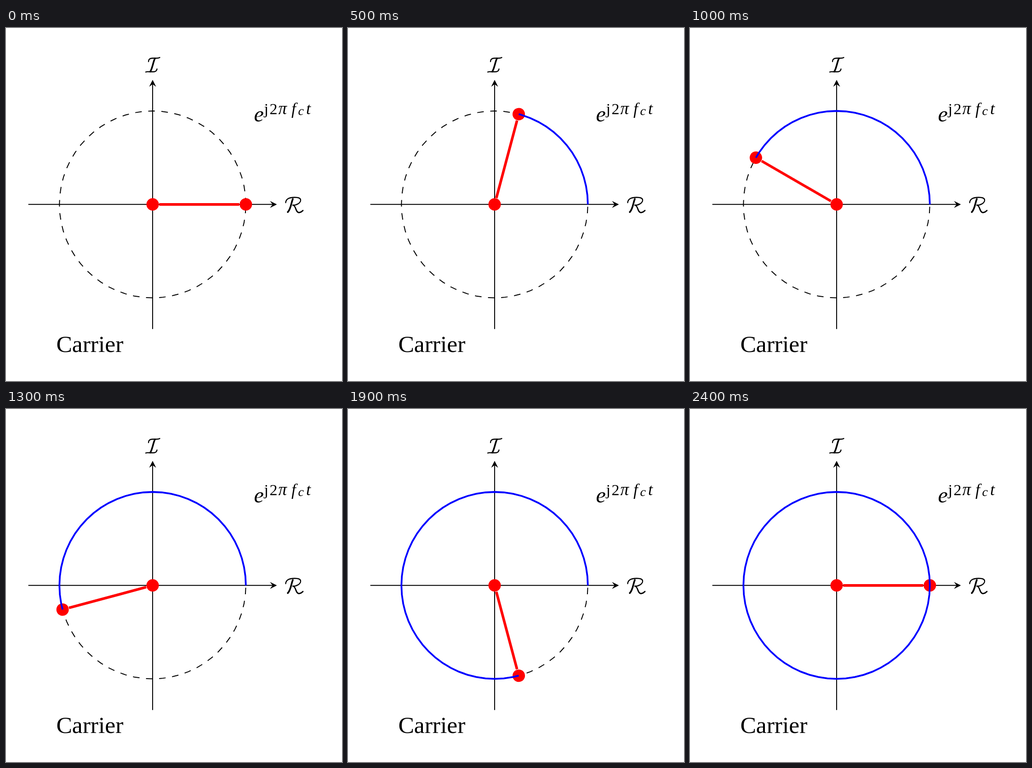
An HTML page for the animation above (2500 ms loop, 731x766 px).

```html
<!DOCTYPE html>
<html lang="en">
<head>
<meta charset="utf-8">
<title>Rotating carrier phasor</title>
<style>
  html, body { margin: 0; width: 100%; height: 100%; overflow: hidden; background: #fff; }
  svg { display: block; width: 731px; height: 766px; }
  text { font-family: "Liberation Serif", serif; }
  .math { font-style: italic; }
  .line { fill: none; stroke: #000; stroke-width: 2; }
  .script { fill: none; stroke: #000; stroke-width: 2.3; stroke-linecap: round; stroke-linejoin: round; }
  .script .thick { stroke-width: 3.6; }
</style>
</head>
<body>
<svg viewBox="0 0 731 766">
  <g transform="translate(319 382.8)">
    <path class="line" d="M-270.4 0H262M0 270.4V-262"/>
    <path id="tip" d="M270.4 0L255.2 7.6L260.9 0L255.2 -7.6Z"/>
    <use href="#tip" transform="rotate(-90)"/>
    <path id="orbit" class="line" stroke-dasharray="14.256"/>
    <g fill="#f00">
      <circle r="13.5"/>
      <g id="arm">
        <path d="M14.4 0H188.4" stroke="#f00" stroke-width="5.7"/>
        <circle cx="202.8" r="13.5"/>
      </g>
    </g>
    <path id="trail" fill="none" stroke="#00f" stroke-width="3.8"/>
  </g>

  <g class="script" role="img" aria-label="I">
    <path d="M310 73C310 67 314 65.5 319 65.5H328C331 65.5 333 65 334.5 64"/>
    <path class="thick" d="M324 66C320 74 319 86 314 94.5"/>
    <path d="M304 95.5C306 94.5 308 95 312 95H321C326 95 328 92 328.5 89"/>
  </g>
  <g class="script" role="img" aria-label="R">
    <path d="M608.5 379C609 371 617 367.5 628 367.5C636 367.5 641 369 641 373.5C641 380 632 384.5 624 384.5"/>
    <path class="thick" d="M624 371C620 381 620 392 613 399.5"/>
    <path d="M625 384.5C631 386 630 400 637 400.5C641 400.5 644 398 646 396" stroke-width="2.8"/>
  </g>

  <text class="math" x="539.5" y="203" font-size="48">e</text>
  <g font-size="34">
    <text x="561.5" y="187">j</text>
    <text x="573.5" y="187">2</text>
    <text class="math" x="592.5" y="187" font-size="37">π</text>
    <text class="math" x="621" y="187" font-size="35">f</text>
    <text class="math" x="635.5" y="188.5" font-size="28">c</text>
    <text class="math" x="653" y="187" font-size="36">t</text>
  </g>
  <text x="109.5" y="703" font-size="51.5">Carrier</text>
</svg>
<script>
  const RADIUS = 202.8, STEP_MS = 100, STEPS = 25, STEP_DEG = 15, CHORD_DEG = 5.625;
  const byId = id => document.getElementById(id);
  const arm = byId("arm"), trail = byId("trail");

  function pointAt(deg) {
    const a = deg * Math.PI / 180;
    return `${(RADIUS * Math.cos(a)).toFixed(2)} ${(-RADIUS * Math.sin(a)).toFixed(2)}`;
  }

  // Arcs are drawn as short chords, counterclockwise from the real axis.
  function arcPath(sweep) {
    let path = "M" + pointAt(0);
    for (let deg = CHORD_DEG; deg < sweep; deg += CHORD_DEG) path += "L" + pointAt(deg);
    return path + "L" + pointAt(sweep);
  }

  function render(ms) {
    const angle = Math.floor(ms / STEP_MS) % STEPS * STEP_DEG;
    arm.setAttribute("transform", `rotate(${-angle})`);
    trail.setAttribute("d", angle ? arcPath(angle) : "");
  }

  byId("orbit").setAttribute("d", arcPath(360));
  const start = performance.now();
  function tick() {
    render(performance.now() - start);
    requestAnimationFrame(tick);
  }
  tick();
</script>
</body>
</html>
```
